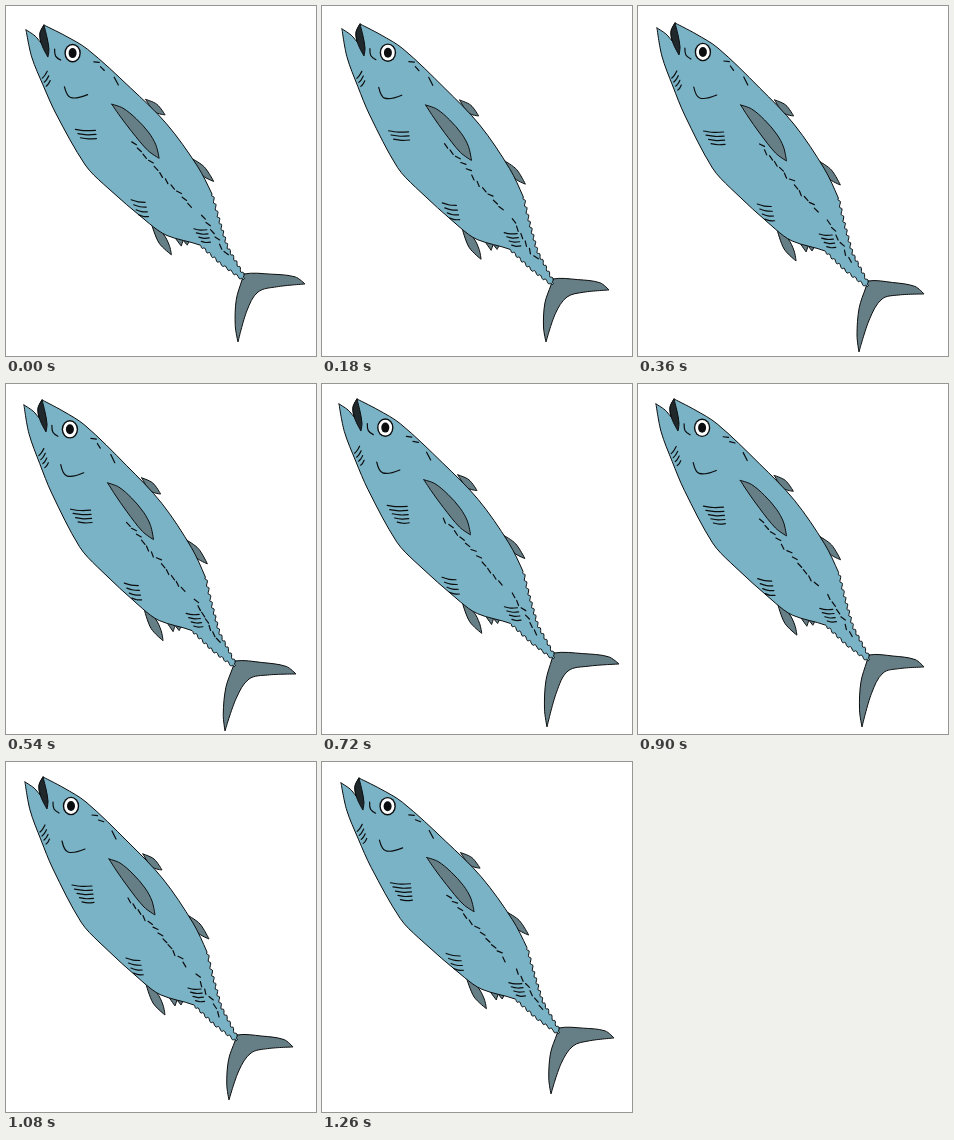
Write an HTML page with a canvas that moves like this. It is 310 by 350 pixels and loops after 1.47 s.

```html
<!DOCTYPE html>
<html lang="en">
<head>
<meta charset="utf-8">
<title>Fish</title>
<style>
  html, body { margin: 0; width: 100%; height: 100%; overflow: hidden; background: #fff; }
  canvas { display: block; }
</style>
</head>
<body>
<canvas id="stage" width="310" height="350"></canvas>
<script>
const ctx = document.getElementById('stage').getContext('2d');
const BLUE = '#7ab3c6', GREY = '#667f86', INK = '#0b0d0e';
const HOLD = 180, LOOP = 1470;

// The resting fish, drawn once; every pose bends these key points.
const LOWER = '19,20 24,48 35,78 47,107 75,160 93,180 138,221 155,233 188,243 208,262 230,279';
const UPPER = '231,275 215,245 206,212 201,190 187,161 157,117 122,80 80,40 58,26 37,15';
const PECTORAL = '103,97 114,101 127,112 139,126 146,139 149,153 138,145 122,125 110,108';
const FINS = [
  '137,92 148,97 156,108 146,105',
  '183,154 194,162 203,177 191,170',
  '140,222 147,241 159,253 157,243 151,231',
  '162,234 169,244 171,238 175,243 178,237'
];

// How far the head and the tail root drift, and where the two tail tips end.
const pose = (head, root, right, bottom) => ({ head, root, right, bottom });
const poses = [
  pose([1, 4], [7, -5], [299, 278], [232, 336]),
  pose([1, 3], [0, 0], [287, 284], [224, 336]),
  pose([0, 2], [-1, 2], [286, 288], [221, 346]),
  pose([-1, 1], [-2, 4], [290, 290], [219, 347]),
  pose([-2, 0], [1, -4], [297, 280], [225, 343]),
  pose([-1, 0], [0, -2], [286, 283], [224, 343]),
  pose([0, 0], [0, 0], [287, 285], [223, 338]),
  pose([0, 1], [6, -7], [292, 276], [229, 332])
];

const parse = text => text.split(' ').map(pair => pair.split(',').map(Number));
const add = ([x, y], dx, dy) => [x + dx, y + dy];
const lerp = (a, b, t) => [a[0] + (b[0] - a[0]) * t, a[1] + (b[1] - a[1]) * t];

function seeded(seed) {
  return () => (seed = (seed * 16807) % 2147483647) / 2147483647;
}

// Smooth curve that keeps acute corners sharp.
function trace(points, closed) {
  const n = points.length;
  const at = i => closed ? points[(i + n) % n] : points[Math.max(0, Math.min(n - 1, i))];
  const tangent = i => {
    const [a, b, c] = [at(i - 1), at(i), at(i + 1)];
    const dot = (b[0] - a[0]) * (c[0] - b[0]) + (b[1] - a[1]) * (c[1] - b[1]);
    const len = Math.hypot(c[0] - a[0], c[1] - a[1]);
    return dot <= 0 ? [0, 0] : [(c[0] - a[0]) / len, (c[1] - a[1]) / len];
  };
  ctx.beginPath();
  ctx.moveTo(...points[0]);
  for (let i = 0; i < (closed ? n : n - 1); i++) {
    const p = at(i), q = at(i + 1), u = tangent(i), v = tangent(i + 1);
    const k = Math.hypot(q[0] - p[0], q[1] - p[1]) / 3;
    ctx.bezierCurveTo(p[0] + u[0] * k, p[1] + u[1] * k, q[0] - v[0] * k, q[1] - v[1] * k, ...q);
  }
  if (closed) ctx.closePath();
}

function shape(points, fill) {
  trace(points, true);
  ctx.fillStyle = fill;
  ctx.fill();
  ctx.lineWidth = 1;
  ctx.stroke();
}

function line(...points) {
  trace(points, false);
  ctx.lineWidth = 1.2;
  ctx.stroke();
}

function oval(x, y, rx, ry, fill) {
  ctx.beginPath();
  ctx.ellipse(x, y, rx, ry, 0, 0, 7);
  ctx.fillStyle = fill;
  ctx.fill();
}

// Parallel curved strokes that get shorter.
function hatch(start, [dx, dy], [sx, sy], count) {
  for (let i = 0; i < count; i++) {
    const k = 1 - 0.1 * i, p = add(start, i * sx, i * sy);
    line(p, add(p, dx * k / 2, dy * k / 2 + 0.8), add(p, dx * k, dy * k));
  }
}

// A row of short strokes, each turned a little at random.
function stitches(a, b, random) {
  const dx = b[0] - a[0], dy = b[1] - a[1], count = Math.round(Math.hypot(dx, dy) / 8);
  for (let i = 0; i < count; i++) {
    const angle = Math.atan2(dy, dx) + (random() - 0.6) * 0.9;
    const p = lerp(a, b, i / count);
    line(p, add(p, 5.5 * Math.cos(angle), 5.5 * Math.sin(angle)));
  }
}

// Finlets along the narrow part of the outline near the tail.
function roughen(points) {
  return points.flatMap((p, i) => {
    const q = points[i + 1];
    if (!q || Math.min(p[0], q[0], p[1], q[1]) < 185) return [p];
    const dx = q[0] - p[0], dy = q[1] - p[1], len = Math.hypot(dx, dy);
    const teeth = Math.round(len / 7), out = [p];
    for (let k = 0; k < teeth; k++) {
      for (const [t, bump] of [[0.5, 1.2], [0.75, -0.8]]) {
        out.push(add(lerp(p, q, (k + t) / teeth), -dy / len * bump, dx / len * bump));
      }
    }
    return out;
  });
}

function tail(root, right, bottom) {
  const fork = add(root, 15, 15);
  const on = (a, b, t, dx, dy) => add(lerp(a, b, t), dx, dy);
  return [
    add(root, 1, -3), on(root, right, 0.45, 0, -6), on(root, right, 0.84, 0, -6), right,
    on(fork, right, 0.4, 0, -2), fork, on(fork, bottom, 0.45, -2, -4), bottom,
    on(bottom, root, 0.25, -4, 0), on(bottom, root, 0.65, -5, 0), add(root, -1, 3)
  ];
}

function draw(index) {
  const { head, root, right, bottom } = poses[index];
  const random = seeded(97 + index * 31);
  const bend = (x, y) => add([x, y], ...lerp(head, root, (y - 18) / 258));
  const bent = text => parse(text).map(p => bend(...p));

  ctx.fillStyle = '#fff';
  ctx.fillRect(0, 0, 310, 350);
  ctx.strokeStyle = INK;
  ctx.lineCap = ctx.lineJoin = 'round';

  shape(tail(bend(230, 276), right, bottom), GREY);
  for (const fin of FINS) shape(bent(fin), GREY);

  const outline = [...bent(LOWER), ...bent(UPPER)];
  const jaw = outline[0], lip = outline.at(-1);
  shape([...roughen(outline), add(lip, -4, 9), add(lip, -3, 18), add(jaw, 9, 6)], BLUE);
  shape([lip, add(lip, -4, 8), add(lip, -2, 20), add(lip, 4, 32), add(lip, 5, 24), add(lip, 3, 12)], '#20282c');
  shape(bent(PECTORAL), GREY);

  const eye = bend(65, 44);
  oval(...eye, 8.2, 9.3, INK);
  oval(...eye, 6.8, 7.9, '#fff');
  oval(...eye, 4, 5, INK);
  line(add(eye, -18, -4), add(eye, -17, 3), add(eye, -12, 7));
  line(bend(56, 79), bend(62, 90), bend(79, 87));

  const strokes = 3 + Math.min(2, index >> 1);
  hatch(bend(34, 70), [5, -7], [2, 4], Math.min(4, strokes));
  hatch(bend(66, 123), [20, 1], [2.5, 4.2], strokes);
  hatch(bend(120, 196), [14, 2.5], [2.5, 5], 4);
  hatch(bend(182, 226), [13, 1], [2.5, 4.2], 4);

  stitches(bend(86, 53), bend(99, 63), random);
  line(bend(106, 69), bend(110, 77));
  stitches(bend(122, 136), bend(182, 206), random);
  stitches(bend(190, 212), bend(216, 257), random);
}

function tick() {
  const t = performance.now() % LOOP;
  draw(Math.min(poses.length - 1, Math.floor(t / HOLD)));
  requestAnimationFrame(tick);
}
tick();
</script>
</body>
</html>
```
